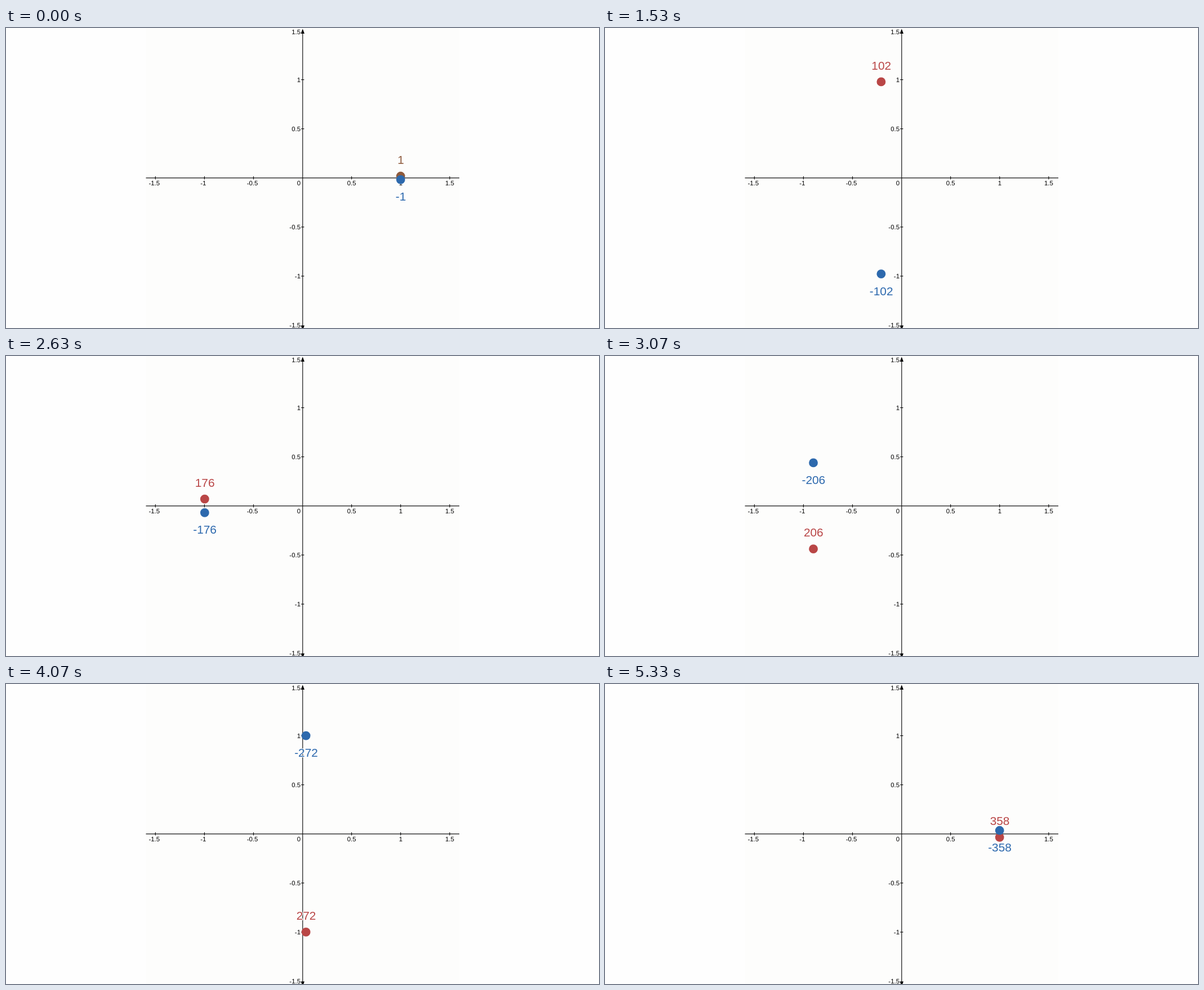
An HTML page for the animation above (5360 ms loop, 1053 by 532 pixels).

```html
<!DOCTYPE html>
<html lang="en">
<head>
<meta charset="utf-8">
<title>Angles on the unit circle</title>
<style>
html, body { margin: 0; width: 100%; height: 100%; overflow: hidden; background: #fefefe; }
svg { display: block; width: 100%; height: 100%; }
text { font-family: "Liberation Sans", Arial, sans-serif; }
.axes line { stroke: #111; stroke-width: 1.2; }
.axes text { font-size: 11.4px; fill: #000; }
.label { font-size: 20.8px; text-anchor: middle; paint-order: stroke; stroke: #fdfdfd; stroke-width: 2px; }
</style>
</head>
<body>
<svg viewBox="0 0 1053 532">
  <rect x="248.5" width="556.5" height="532" fill="#fdfdfc"/>
  <g class="axes" id="axes"></g>
  <g id="points"></g>
</svg>
<script>
const LOOP = 5360, UNIT = 174.2, OX = 526.6, OY = 265.8;
const BROWN = [142, 90, 60], RED = [185, 70, 70], BLUE = '#2d69ad';
const axes = document.getElementById('axes');
const points = document.getElementById('points');

function add(parent, tag, attrs, text = '') {
  const el = document.createElementNS('http://www.w3.org/2000/svg', tag);
  for (const key in attrs) el.setAttribute(key, attrs[key]);
  el.textContent = text;
  return parent.appendChild(el);
}

const line = (x1, y1, x2, y2) => add(axes, 'line', { x1, y1, x2, y2 });

function drawAxes() {
  line(248.5, OY, 805, OY);
  line(OX + 0.2, 4, OX + 0.2, 532);
  add(axes, 'path', { d: 'M526.8 1.5l3.2 8.5h-6.4zM526.8 536l3.2-8.5h-6.4z' });
  for (let n = -3; n <= 3; n++) {
    const v = n / 2, x = OX + v * UNIT, y = OY - v * UNIT;
    const shift = n < 0 ? -2 : n ? 0 : -6.6;
    add(axes, 'text', { x: x + shift, y: 279, 'text-anchor': 'middle' }, v);
    if (!n) continue;
    line(x, OY - 2.7, x, OY + 2.7);
    if (Math.abs(n) < 3) line(OX - 2.4, y, OX + 2.8, y);
    const base = Math.min(531.5, Math.max(11, y + 3.9));
    add(axes, 'text', { x: 523, y: base, 'text-anchor': 'end' }, v);
  }
}

function makePoint(fill) {
  return {
    dot: add(points, 'circle', { r: 7.9, fill }),
    label: add(points, 'text', { class: 'label', fill })
  };
}

function place(point, degrees, offset) {
  const a = degrees * Math.PI / 180;
  const x = OX + UNIT * Math.cos(a), y = OY - UNIT * Math.sin(a);
  point.dot.setAttribute('cx', x);
  point.dot.setAttribute('cy', y);
  point.label.setAttribute('x', x + 0.3);
  point.label.setAttribute('y', y + offset);
  point.label.textContent = degrees;
}

// Three steps every 100 ms, starting at 0, 30 and 70.
function stepAt(t) {
  const r = t % 100;
  return 3 * Math.floor(t / 100) + (r >= 30) + (r >= 70);
}

function render(t) {
  const step = stepAt(t);
  const degrees = Math.max(1, 2 * Math.round(1.125 * step - 1));
  const k = Math.min(1, step / 40);
  const warm = `rgb(${BROWN.map((c, i) => Math.round(c + (RED[i] - c) * k))})`;
  for (const el of [up.dot, up.label]) el.setAttribute('fill', warm);
  place(up, degrees, -21.7);
  place(down, -degrees, 37.4);
}

drawAxes();
const up = makePoint('#b94646');
const down = makePoint(BLUE);
const start = performance.now();

function tick() {
  render((performance.now() - start) % LOOP);
  requestAnimationFrame(tick);
}
tick();
</script>
</body>
</html>
```
